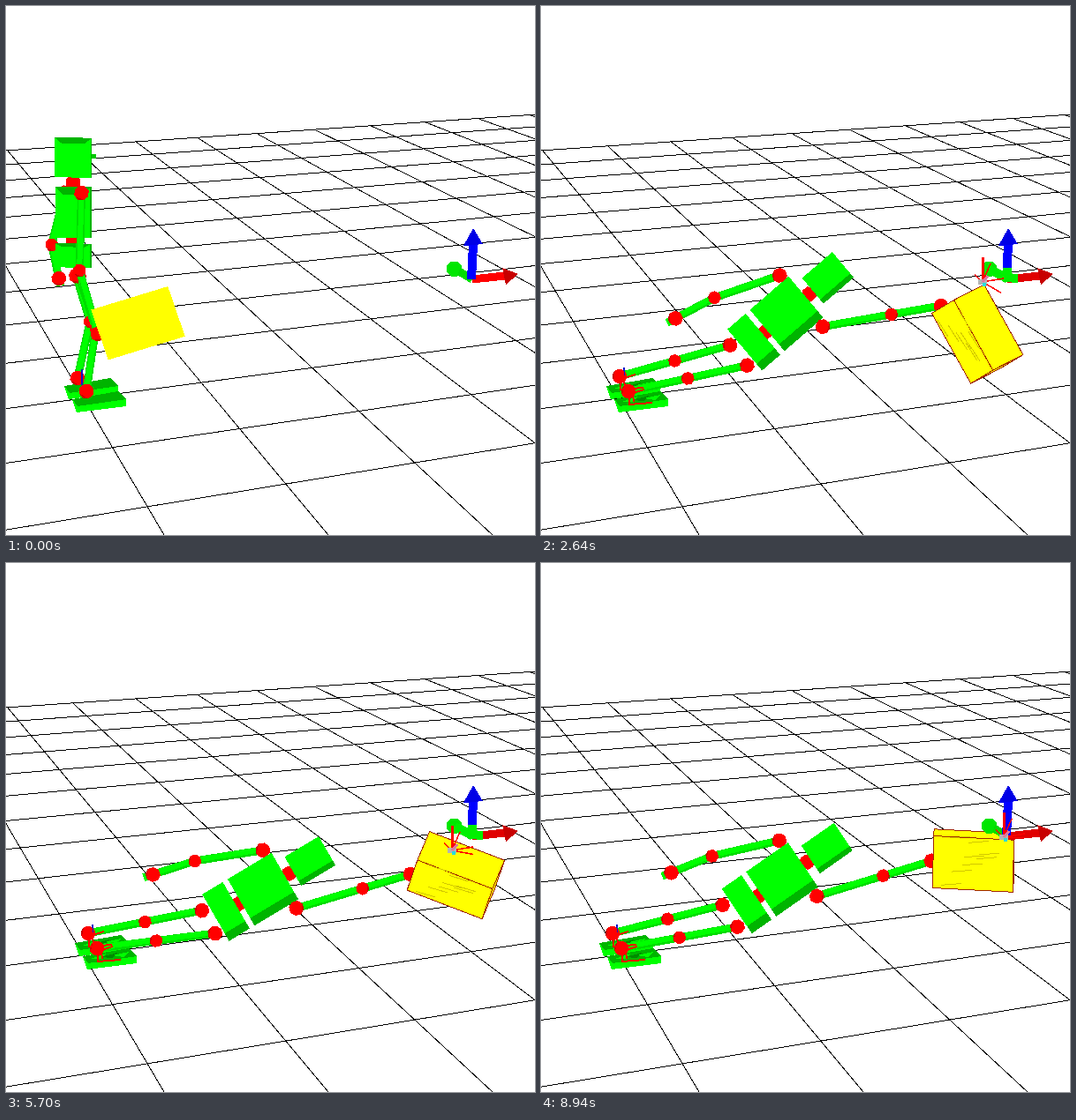
Animation of 599x600 px, one loop 9 s. Source, as an HTML page:

```html
<!DOCTYPE html>
<html lang="en">
<head>
<meta charset="utf-8">
<title>Reaching figure</title>
<style>
html, body { margin: 0; width: 100%; height: 100%; overflow: hidden; background: #fff; }
svg { display: block; width: 100%; height: 100%; }
</style>
</head>
<body>
<svg viewBox="0 0 599 600" shape-rendering="crispEdges">
  <g id="floor"></g>
  <g id="scene"></g>
</svg>
<script>
const LOOP = 9000, STEP = 60;
const GREEN = '#00ff00', MID = '#00dc00', SHADE = '#00b400';
const RED = '#ff0000', DARK = '#c80000', YELLOW = '#ffff00';

const add = (p, q, k = 1) => [p[0] + q[0] * k, p[1] + q[1] * k];
const sub = (p, q) => add(p, q, -1);
const scale = (p, k) => [p[0] * k, p[1] * k];
const lerp = (a, b, k) => a + (b - a) * k;
const mid = (p, q, k = .5) => add(p, sub(q, p), k);
const polar = (r, deg) => [r * Math.cos(deg * Math.PI / 180), r * Math.sin(deg * Math.PI / 180)];
const ramp = (t, from, to) => Math.min(1, Math.max(0, (t - from) / (to - from)));
const smooth = k => k * k * (3 - 2 * k);
const easeOut = k => 1 - (1 - k) ** 2;

const xy = p => p.map(v => v.toFixed(1)).join();
const poly = (pts, fill, extra = '') => `<polygon points="${pts.map(xy).join(' ')}" fill="${fill}" ${extra}/>`;
const line = (p, q, color, width = 1) =>
  `<path d="M${xy(p)}L${xy(q)}" stroke="${color}" stroke-width="${width}"/>`;
const face = (p, a, b) => [p, add(p, a), add(add(p, a), b), add(p, b)];

// x, y: chest; tilt: spine angle; hx, hy: hand from chest;
// turn, roll: crate angles; step: foot offset; up: 1 when upright
const stand = { x: 76, y: 234, tilt: -90, hx: 30, hy: 139, turn: -17, roll: 0, step: 0, up: 1 };
const high = { x: 278, y: 349, tilt: -41, hx: 177, hy: -8, turn: 61, roll: 61, step: 8, up: 0 };
const low = { x: 290, y: 366, tilt: -37, hx: 171, hy: -5, turn: 34, roll: 32, step: 11, up: 0 };
const flat = { x: 291, y: 370, tilt: -31, hx: 169, hy: -16, turn: 21, roll: 53, step: 12, up: 0 };
const near = { x: 277, y: 359, tilt: -36, hx: 170, hy: -16, turn: 19, roll: 62, step: 3, up: 0 };
const rest = { x: 273, y: 359, tilt: -35, hx: 171, hy: -20, turn: 3, roll: 10, step: 0, up: 0 };

function blend(a, b, k) {
  const out = {};
  for (const key in a) out[key] = lerp(a[key], b[key], k);
  return out;
}

// Fall forward, swing while searching, then settle.
function poseAt(t) {
  const fall = easeOut(ramp(t, 0, 540));
  const swing = .5 - .5 * Math.cos((t - 2640) / 600 * 2 * Math.PI);
  let p = blend(stand, blend(high, low, swing), fall);
  p = blend(p, flat, smooth(ramp(t, 4800, 5700)));
  p = blend(p, near, smooth(ramp(t, 5700, 6660)));
  p = blend(p, rest, easeOut(ramp(t, 6660, 8940)));
  p.hy += 78 * Math.sin(Math.PI * fall);
  return p;
}

function joint(p, dir, size = 16) {
  const n = Math.hypot(...dir) || 1, u = scale(dir, size / n), v = [-u[1], u[0]];
  const ring = Array.from({ length: 8 }, (_, i) => {
    const [c, s] = polar(.54, 22.5 + 45 * i);
    return add(add(p, u, c), v, s);
  });
  return poly(ring, RED) + poly([ring[7], ring[0], ring[1]], DARK);
}

const bone = (p, q) => line(p, q, MID, 9) + line(add(p, [0, -1]), add(q, [0, -1]), GREEN, 6);
const limb = (a, b, c) => bone(a, b) + bone(b, c) +
  joint(a, sub(b, a)) + joint(b, sub(c, a), 14) + joint(c, sub(c, b));

// Block spanned by its length a and width b, with shaded far and lower sides.
function block(p, a, b, up) {
  const side = lerp(.16, .04, up), far = add(p, a);
  return poly(face(p, a, b), GREEN) +
    poly(face(add(p, b, 1 - side), a, scale(b, side)), SHADE) +
    poly([far, add(far, b), add(add(far, b, .8), a, -.15 * up), add(add(far, b, .2), a, -.15 * up)], SHADE);
}

function foot(x, y, up) {
  const at = (dx, dy) => [x + dx, y + dy];
  const tread = up > .5 ? '' : [0, 1, 2].map(i =>
    poly([at(8 + i * 13, 3 - i * 2), at(26 + i * 13, -3 - i), at(20 + i * 13, 3 - i)],
      i % 2 ? '#008c00' : GREEN)).join('');
  return poly([at(0, 0), at(52, -9), at(61, 0), at(61, 8), at(5, 15)], GREEN) +
    poly([at(0, 0), at(52, -9), at(61, 0), at(6, 8)], SHADE) + tread;
}

const noise = i => Math.abs(Math.sin(i * 127.1) * 43758.5) % 1;

function crate(hand, turn, roll, up) {
  const u = polar(91, turn);
  const v = polar(60 * polar(1, roll)[0], turn + 88);
  const w = polar(44 * polar(1, roll)[1], turn - 88);
  const p = add(hand, v, -.5), tip = add(p, u);
  const edge = up > .9 ? '' : 'stroke="#a02800"';
  let s = poly(face(p, u, w), YELLOW, edge) + poly(face(p, u, v), YELLOW, edge) +
    poly(face(tip, v, w), YELLOW, edge);
  if (up > .9) return s;
  for (let i = 1; i < 9; i++) {
    const a = add(add(p, u, noise(i) * .65 + .05), v, noise(i + 20));
    s += line(a, add(add(a, u, .25), v, -.05), '#d2c800');
  }
  return s;
}

function worldAxes(t) {
  let s = line([528, 310], [508, 298], MID, 9) + joint([507, 298], [1, 0], 17)
    .replace(RED, '#00e600').replace(DARK, MID);
  s += line([528, 310], [565, 306], t ? '#e00000' : RED, 9) +
    poly([[562, 297], [580, 304], [566, 316]], DARK) +
    line([527, 310], [529, 270], '#0000ff', 10) +
    poly([[518, 272], [529, 252], [540, 270]], '#0000e6');
  if (t && t < 6200)
    s += '<path d="M508 299L527 308L540 309M528 297V310" fill="none" stroke="#00f000" stroke-width="10"/>';
  return s;
}

function gripAxes(g, turn) {
  const rays = [[1, -28], polar(24, turn / 2), [24, -4], [-9, -8], [9, -21]];
  return rays.map((r, i) => line(g, add(g, r), RED, i ? 1.5 : 3)).join('') +
    poly(face(add(g, [-5, -3]), [10, 0], [0, 6]), '#b4b4b4') +
    poly(face(add(g, [0, 1]), [4, 0], [0, 4]), '#28dcdc') +
    line(g, add(g, [6, -7]), '#dc78a0', 3);
}

function ankleAxes(q) {
  return line(q, add(q, [1, 16]), RED, 2) + line(add(q, [1, 15]), add(q, [27, 13]), RED, 2) +
    line(add(q, [-5, 5]), add(q, [18, -2]), RED, 2) + line(add(q, [4, -6]), add(q, [6, 12]), RED, 2);
}

function draw(t) {
  const { x, y, tilt, hx, hy, turn, roll, step, up } = poseAt(t);
  const chest = [x, y], along = polar(1, tilt), across = polar(1, tilt + 91);
  const local = (a, b) => add(add(chest, along, a), across, b);

  // Torso block, with pelvis and head in proportion to it.
  const a = scale(along, 58), b = scale(across, 61 - 20 * up);
  const waist = add(add(chest, a, -.5), b, -.5);
  const headW = lerp(.62, 1.04, up);
  const skull = add(add(chest, a, .68), b, -headW / 2);

  const shoulder = side => local(22, side * 38 * (1 - .75 * up));
  const hip = side => local(-72, side * 15 * (1 - .9 * up) + 5 * up);
  const reach = 1 - .22 * up;
  const elbowB = add(shoulder(-1), polar(78 * reach, tilt + 202 - 8 * up));
  const wristB = add(elbowB, polar(50 * reach, tilt + 193 - 25 * up));
  const hand = add(chest, [hx, hy]), wrist = add(hand, [-2, -1]);
  const elbow = add(mid(shoulder(1), wrist, .58), [-13, -5], up);
  const ankleB = [81 + step, 420 + 2 * up], ankle = [91 + step, 437];
  const leg = (h, k) => limb(h, add(mid(h, k), [15, -6], up), k);

  let s = foot(66 + step, 431, up);
  s += line(wristB, add(wristB, sub(wristB, elbowB), .22), GREEN, 9);
  s += limb(shoulder(-1), elbowB, wristB) + leg(hip(-1), ankleB);
  s += joint(add(chest, a, .59), a) + joint(add(chest, a, -.56), a);
  s += block(add(waist, a, -.58), scale(a, .47), b, up) + block(waist, a, b, up) +
    block(skull, scale(a, .78), scale(b, headW), up);
  if (up > .9) s += '<rect x="97" y="168" width="5" height="5" fill="#00c800"/>';
  s += foot(75 + step, 446, up) + leg(hip(1), ankle);
  s += line(add(ankleB, [5, -10]), add(ankleB, [5, 8]), '#1414c8', 1.5);
  if (up < .9) s += ankleAxes(ankleB) + ankleAxes(ankle);
  s += limb(shoulder(1), elbow, wrist) + crate(hand, turn, roll, up) + worldAxes(t);
  if (up < .9) {
    const settle = smooth(ramp(t, 5700, 6660));
    s += gripAxes(add(hand, [lerp(45, 80, settle), -28]), turn);
  }
  document.getElementById('scene').innerHTML = s;
}

// Perspective grid: each family of lines meets at its own vanishing point.
function drawFloor() {
  const eye = [-268, -160];
  let s = '';
  for (let i = 0; i <= 12; i++) {
    const y = 1 / (1 / 319 - i * .00015) - 155;
    s += line([0, y], [599, y * .866 - 18.9], '#000');
  }
  for (let i = 0; i <= 10; i++) {
    const m = (179 + 186 * i - eye[0]) / (600 - eye[1]);
    const x = (eye[0] + m * (164 - eye[1])) / (1 + .0684 * m);
    s += line([x, 164 - .0684 * x], [179 + 186 * i, 600], '#000');
  }
  document.getElementById('floor').innerHTML = s;
}

drawFloor();
const start = performance.now();
let last = -1;
function tick() {
  const t = Math.floor((performance.now() - start) % LOOP / STEP) * STEP;
  if (t !== last) draw(last = t);
  requestAnimationFrame(tick);
}
tick();
</script>
</body>
</html>
```
